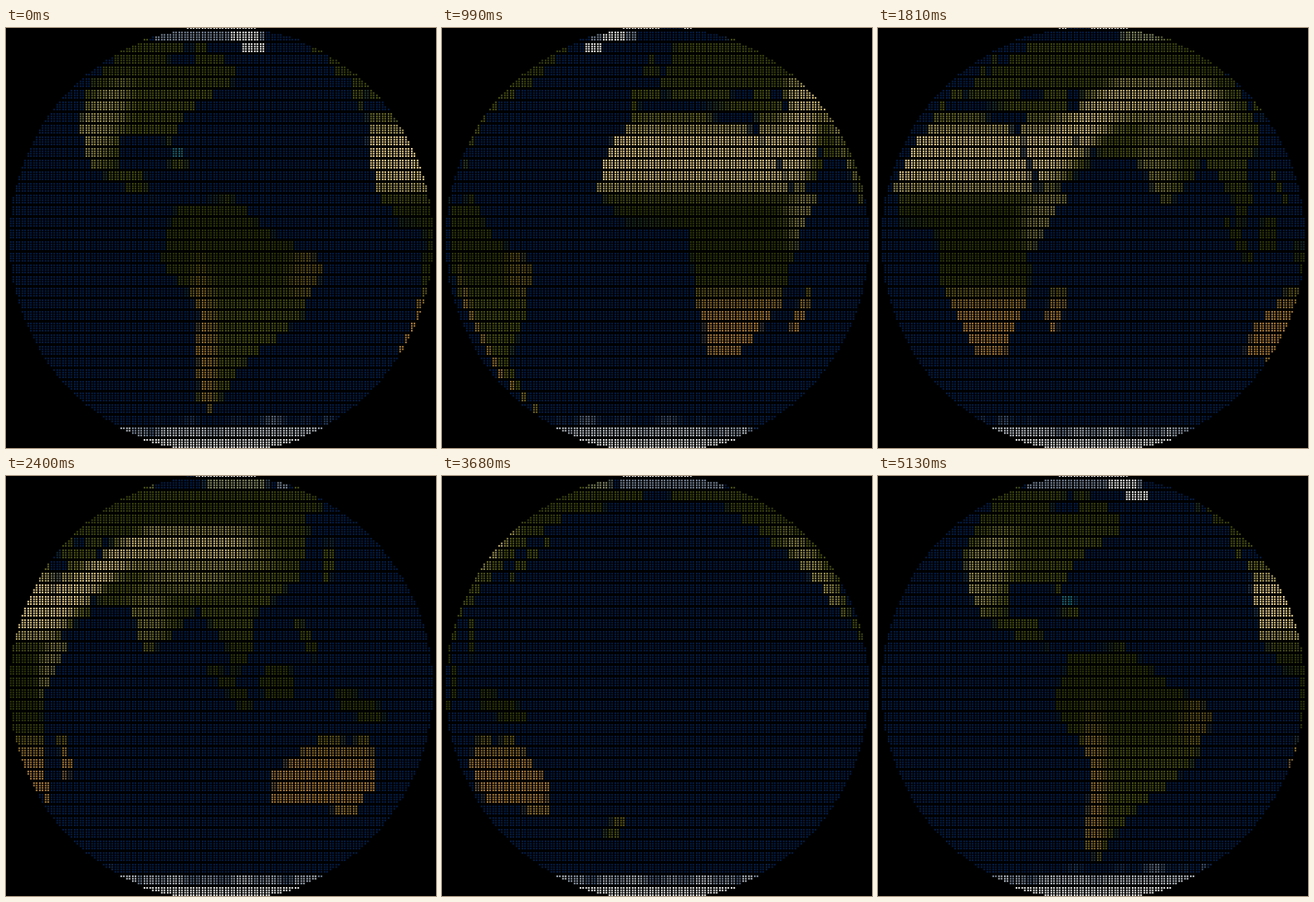
These frames come from a looping animation (481 by 469 pixels, 5250 ms). An HTML page with a canvas:

```html
<!DOCTYPE html>
<html lang="en">
<head>
<meta charset="utf-8">
<title>Dotted globe</title>
<style>
  html, body { margin: 0; width: 100%; height: 100%; overflow: hidden; background: #000; }
  canvas { display: block; }
</style>
</head>
<body>
<canvas id="stage" width="481" height="469"></canvas>
<script>
const LOOP = 5250, STEPS = 90, START = -68.5, TURN = 4.07;
const COLS = 73, ROWS = 37, CELL_W = 6.5, CELL_H = 13, LEFT = 4, FIRST_ROW = -4;
const CX = 241.2, CY = 236.5, RX = 237, RY = 239;
const DOT = 1.8, GAP_X = 2.9, GAP_Y = 2.7;

const SEA = [3, 31, 74], OLIVE = [78, 86, 22], FOREST = [48, 58, 10];
const SAND = [255, 228, 160], RUST = [214, 146, 78], SNOW = [245, 247, 245];

// Key points of the coasts, as longitude,latitude
const coasts = {
  northAmerica: 'M-166,66 -128,71 -82,68 -64,59 -56,50 -76,37 -81,26 -84,30 -97,28 -96,18 -88,20 -83,10 -78,8 -105,20 -113,29 -124,42 -135,58 -160,58Z',
  southAmerica: 'M-77,9 -62,11 -50,1 -35,-6 -41,-22 -58,-36 -68,-54 -74,-50 -71,-19 -81,-5Z',
  africa: 'M-17,14 -13,28 -6,36 10,37 33,31 43,11 51,12 40,-4 39,-16 27,-34 18,-34 12,-17 9,4 -8,4.5Z',
  eurasia: 'M-9,37 -9,43 -1,44 8,57 12,65 25,71 68,69 104,77 190,67 162,58 140,53 128,38 122,30 108,20 107,10 102,2 98,15 91,22 78,8 71,21 57,25 50,29 59,22 44,12 34,30 36,36 27,38 16,39 3,43Z',
  australia: 'M114,-23 130,-12 137,-16 142,-11 153,-26 148,-38 131,-32 115,-34Z'
};

const clamp = v => Math.min(1, Math.max(0, v));
const mix = (a, b, k) => a.map((v, i) => v + (b[i] - v) * clamp(k));
const hill = d => Math.exp(-(d ** 4));
const bump = (lon, lat, x, y, rx, ry) => hill(Math.hypot((lon - x) / rx, (lat - y) / ry));
const ramp = (a, b, v) => {
  const k = clamp((v - a) / (b - a));
  return k * k * (3 - 2 * k);
};

function landMask() {
  const canvas = document.createElement('canvas');
  canvas.width = 360;
  canvas.height = 180;
  const g = canvas.getContext('2d');
  const oval = (lon, lat, rx, ry, tilt = 0) => {
    g.beginPath();
    g.ellipse(lon, lat, rx, ry, tilt, 0, 7);
    g.fill();
  };
  // The second pass wraps the far east round the date line
  for (const shift of [0, -360]) {
    g.setTransform(1, 0, 0, -1, 180 + shift, 90);
    for (const coast of Object.values(coasts)) g.fill(new Path2D(coast));
  }
  g.setTransform(1, 0, 0, -1, 180, 90);
  oval(47, -19, 2.5, 7, -0.25);  // Madagascar
  oval(-2, 54, 3, 4);            // Britain
  oval(138, 37, 2, 8, -0.7);     // Japan
  oval(114, 1, 5, 5);            // Borneo
  oval(101, 0, 2, 8, 0.8);       // Sumatra
  oval(140, -5, 10, 3, -0.3);    // New Guinea
  oval(123, 13, 2, 6, 0.4);      // Philippines
  oval(172, -41, 2, 7, -0.7);    // New Zealand
  oval(-79, 21.5, 5, 1, -0.2);   // Cuba
  g.globalCompositeOperation = 'destination-out';
  oval(34, 43.5, 6, 2);          // Black Sea
  oval(51, 42, 2.5, 5);          // Caspian Sea
  oval(-85, 59, 7, 5);           // Hudson Bay
  return g.getImageData(0, 0, 360, 180).data;
}

function landColour(lon, lat) {
  // Dry belt: across the Sahara, then climbing to the Gobi
  const climb = ramp(40, 70, lon);
  const belt = hill((lat - 23 - 18 * climb) / (10 - 2.5 * climb)) * ramp(-30, -17, lon) * ramp(122, 100, lon);
  const north = Math.max(
    belt * (1 - 0.2 * climb),
    0.5 * bump(lon, lat, -109, 33, 11, 15),
    0.45 * bump(lon, lat, 46, 5, 8, 11),
    0.4 * bump(lon, lat, 88, 33, 16, 6),
    0.3 * bump(lon, lat, 76, 19, 7, 10));
  const south = Math.max(
    0.75 * hill((lat + 26) / 11) * ramp(5, 14, lon),
    0.6 * bump(lon, lat, -70, -32, 4, 24),
    0.3 * bump(lon, lat, -40, -9, 6, 8));
  const green = mix(OLIVE, FOREST, hill(lat / 15) + 0.6 * hill((lat - 56) / 10));
  const dry = mix(mix(green, RUST, south), SAND, north);
  return mix(dry, SNOW, 0.45 * ramp(68, 74, lat));
}

function iceCover(lon, lat) {
  const rad = lon * Math.PI / 180;
  const greenland = Math.hypot((lon + 43) / 13, (lat - 72) / 10) < 1;
  const openSea = lon > 5 && lon < 50;
  if (greenland || lat < -67 || lat > 79 && !openSea) return 1;
  if (lat > 71 && (lon < -20 || lon > 155)) return 0.5;
  const edge = -59 + Math.sin(rad * 7) + Math.sin(rad * 17) + 3 * Math.max(0, Math.cos(rad + 0.5));
  return 0.8 * ramp(edge, edge - 7, lat);
}

function paintMap() {
  const mask = landMask();
  return Array.from({ length: 360 * 180 }, (_, i) => {
    const lon = i % 360 - 179.5, lat = 89.5 - Math.floor(i / 360);
    const reef = 0.6 * bump(lon, lat, -77.5, 24, 2, 1.5);
    const ground = mix(mix(SEA, [50, 170, 170], reef), landColour(lon, lat), mask[i * 4 + 3] / 255);
    return `rgb(${mix(ground, SNOW, iceCover(lon, lat)).map(Math.round)})`;
  });
}

// Each cell keeps its lit dots and its place on the sphere
function buildCells() {
  const cells = [];
  for (let row = 0; row < ROWS; row++) {
    for (let col = 0; col < COLS; col++) {
      const x = LEFT + (col + 0.5) * CELL_W, y = FIRST_ROW + row * CELL_H;
      const dots = [];
      for (let i = 0; i < 8; i++) {
        const a = i % 2 - 0.5, b = (i >> 1) - 1.5;
        const far = Math.hypot((x + a * CELL_W / 2 - CX) / RX, (y + b * CELL_H / 4 - CY) / RY);
        if (far < 1) dots.push([x - 0.4 + a * GAP_X - DOT / 2, y + b * GAP_Y - DOT / 2]);
      }
      if (!dots.length) continue;
      let u = (x - CX) / RX, v = (CY - y) / RY;
      const fit = Math.min(1, 0.995 / Math.hypot(u, v));
      u *= fit;
      v *= fit;
      const lon = Math.atan2(u, Math.sqrt(1 - u * u - v * v)) * 180 / Math.PI;
      const lat = Math.asin(v) * 180 / Math.PI;
      cells.push({ dots, lon, line: Math.floor(90 - lat) * 360 });
    }
  }
  return cells;
}

const pen = document.getElementById('stage').getContext('2d');
const map = paintMap(), cells = buildCells();
let shown = -1;

function draw(step) {
  const centre = START + step * TURN;
  pen.fillStyle = '#000';
  pen.fillRect(0, 0, 481, 469);
  for (const { dots, lon, line } of cells) {
    pen.fillStyle = map[line + Math.floor(lon + centre + 540) % 360];
    for (const [x, y] of dots) pen.fillRect(x, y, DOT, DOT);
  }
}

function tick() {
  const t = performance.now() % LOOP;
  // The first and the last pose are held for two steps
  const step = Math.min(88, Math.max(1, Math.floor(t / LOOP * STEPS + 0.1)));
  if (step !== shown) draw(shown = step);
  requestAnimationFrame(tick);
}
tick();
</script>
</body>
</html>
```
